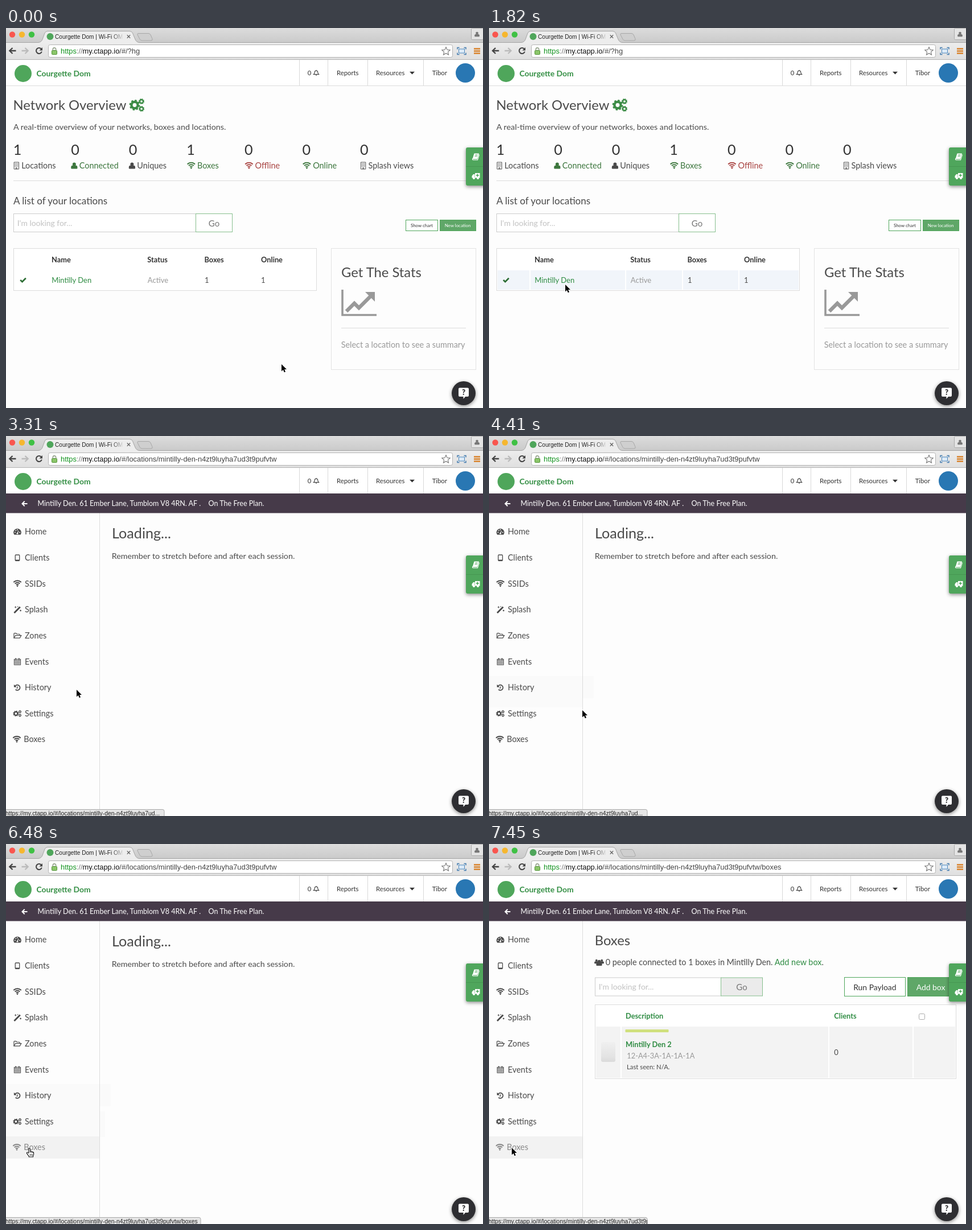
An HTML page for the animation above (8000 ms loop, 838x668 px).

```html
<!DOCTYPE html>
<html lang="en">
<head>
<meta charset="utf-8">
<title>Network overview</title>
<style>
  html, body { margin: 0; width: 100%; height: 100%; overflow: hidden; background: #fdfdfd; }
  svg { display: block; width: 100vw; height: 100vh; }
  text { font-family: Lato, sans-serif; white-space: pre; }
  .ui { font-family: "Liberation Sans", Arial, sans-serif; }
  .line { fill: none; stroke: currentColor; }
</style>
</head>
<body>
<svg id="stage" viewBox="0 0 838 668" xmlns="http://www.w3.org/2000/svg"></svg>
<script>
const LOOP = 8000;
const INK = '#4a4a4a', DARK = '#333', GREY = '#999', GREEN = '#2f8c43', LEAF = '#4fa65b',
      OK = '#3c763d', BAD = '#a94442', RULE = '#dcdcdc';
const PLACE = 'Mintilly Den', BRAND = 'Courgette Dom';
const SLUG = '/#/locations/mintilly-den-n4zt9luyha7ud3t9pufvtw';

// Drawing helpers
const text = (x, y, size, str, fill = INK, extra = '') =>
  `<text x="${x}" y="${y}" font-size="${size}" fill="${fill}" ${extra}>${str}</text>`;
const bold = (x, y, size, str, fill = DARK) => text(x, y, size, str, fill, 'font-weight="700"');
const ui = (x, y, size, str, fill) => text(x, y, size, str, fill, 'class="ui"');
const rect = (x, y, w, h, fill, extra = '') =>
  `<rect x="${x}" y="${y}" width="${w}" height="${h}" fill="${fill}" ${extra}/>`;
const frame = (x, y, w, h, stroke, fill = 'none', extra = '') =>
  rect(x + .5, y + .5, w - 1, h - 1, fill, `stroke="${stroke}" ${extra}`);
const path = (d, width = 1, extra = '') => `<path class="line" d="${d}" stroke-width="${width}" ${extra}/>`;
const solid = d => `<path d="${d}" fill="currentColor"/>`;
const dot = (x, y, r, fill = 'currentColor') => `<circle cx="${x}" cy="${y}" r="${r}" fill="${fill}"/>`;
const at = (x, y, body, color = INK, scale = 1) =>
  `<g transform="translate(${x} ${y}) scale(${scale})" color="${color}">${body}</g>`;
// Shows content only inside the given [from, to) windows
const during = (body, ...spans) => `<g data-on='${JSON.stringify(spans)}'>${body}</g>`;

const gear = (x, y, r) => `<g transform="translate(${x} ${y})" class="line">
  <circle r="${r * .6}" stroke-width="${r * .46}"/>
  <circle r="${r * .88}" stroke-width="${r * .26}" stroke-dasharray="${r * .37} ${r * .321}"/></g>`;
const person = solid('M-6 4.5V3Q-6-.5-2.5-.5H2.5Q6-.5 6 3V4.5Q6 6 4.5 6H-4.5Q-6 6-6 4.5z') + dot(0, -2.8, 3.2);
const scaled = (x, y, scale, body) => `<g transform="translate(${x} ${y}) scale(${scale})">${body}</g>`;

const icons = {
  wifi: path('M-7.2-7.2A10 10 0 0 1 7.2-7.2M-4.7-4.5A6.5 6.5 0 0 1 4.7-4.5M-2.3-2A3.2 3.2 0 0 1 2.3-2', 2) + dot(0, 0, 1.4),
  user: person,
  building: path('M-4.5-6.5H4.5V6.5H-4.5zM-1 6.5V4H1V6.5') + path('M-2.2-4.6V3M0-4.6V3M2.2-4.6V3', 1.2, 'stroke-dasharray="1.3 1.1"'),
  check: path('M-4.8 0L-1.5 3.2 4.8-3.2', 2.7),
  cogs: gear(-2.8, 0, 5.4) + gear(4.8, -3.4, 2.9) + gear(4.8, 3.4, 2.9),
  home: solid('M-6 5.5A7.4 7.4 0 1 1 6 5.5z') + dot(-4.5, 1, 1, '#fff') + dot(-3, -2.6, 1, '#fff') +
    dot(0, -4, 1, '#fff') + dot(4.5, 1, 1, '#fff') + '<path d="M0 3L2-2" stroke="#fff" stroke-width="1.2"/>' + dot(0, 3, 1.5, '#fff'),
  tablet: path('M-4-4.5Q-4-5.5-3-5.5H3Q4-5.5 4-4.5V4.5Q4 5.5 3 5.5H-3Q-4 5.5-4 4.5zM-4 4.4H4', 1.4),
  wand: path('M-6 6L5.2-5.2', 3) + path('M-3.5-6.5V-3M-5.2-4.7H-1.8M6 0V3.2M4.4 1.6H7.6M.8-7V-5', 1.1),
  folder: path('M-6.5 4.5V-3.7Q-6.5-4.7-5.5-4.7H-2.5L-1-3H3.5Q4.5-3 4.5-2V-.5M-6.5 4.5L-3.5-.5H7.3L4.5 4.5z', 1.3),
  calendar: path('M-6-4.5H6V6H-6zM-6-2H6', 1.1) + path('M-6 .8H6M-6 3.4H6M-3-2V6M0-2V6M3-2V6', .8) + path('M-3-6.7V-3.4M3-6.7V-3.4', 2),
  history: path('M-4.2-2.8A5 5 0 1 1-3.6 3.6', 1.9) + solid('M-6.5-6V-.8H-1.3z') + path('M.3-2.5V1H-2', 1.2),
  group: scaled(-4.7, -1.5, .62, person) + scaled(4.7, -1.5, .62, person) + scaled(0, .8, .85, person),
  back: path('M5 0H-3.5M.2-4.2L-4 0 .2 4.2', 2),
  bell: path('M-4.5 2.5Q-2.7 1-2.7-1.5Q-2.5-4 0-4Q2.5-4 2.7-1.5Q2.7 1 4.5 2.5zM-1 3.5Q0 5 1 3.5M0-4V-5.2', 1.1)
};
const icon = (name, x, y, color, scale) => at(x, y, icons[name], color, scale);

// Browser window
const address = tail => ui(96, 45, 12.85,
  `<tspan fill="#12931f">https</tspan><tspan fill="#777">://</tspan>my.ctapp.io<tspan fill="#444">${tail}</tspan>`, '#111');

const chrome = `
  ${rect(0, 0, 838, 26, 'url(#strip)')}${rect(0, 25, 838, 31, 'url(#bar)')}
  <path d="M0 25.5H57Q62 25 64 20L68 9Q69.5 5.500 73 5.500H217Q221 5.500 222.500 9L227 20Q229 25 234 25.500H838" fill="#ededed" stroke="#a5a5a5"/>
  <path d="M233 9.500H250Q253 9.500 254 12L257 19Q258 22 255 22H239Q236 22 235 19.500L231 12Q230 9.500 233 9.500z" fill="#cfcfcf" stroke="#a8a8a8"/>
  ${dot(11, 11.5, 5.2, '#f9564f')}${dot(28, 11.5, 5.2, '#f6b72f')}${dot(45, 11.5, 5.2, '#3fc144')}
  ${dot(77.5, 15, 6, LEAF)}${ui(86, 19, 10.1, BRAND + ' | Wi-Fi OM', 'url(#fade)')}
  ${at(215.5, 15, path('M-2.7-2.7L2.7 2.7M-2.7 2.7L2.7-2.7', 1.3), '#666')}
  ${frame(817, 0, 22, 21, '#aaa', '#e4e4e4', 'rx="2"')}${icon('user', 827.5, 11, '#777', .72)}
  ${at(11, 40, path('M6.5 0H-4.5M.5-5L-4.7 0 .5 5', 2.3), '#444')}
  ${at(34, 40, path('M-6.5 0H4.5M-.5-5L4.7 0-.5 5', 2.3), '#bbb')}
  ${at(58, 40, path('M4.2-2.8A5 5 0 1 0 4.8 1.5', 2.1) + solid('M6-6V-.5H.5z'), '#444')}
  ${frame(74, 29, 711, 23, '#b4b4b4', '#fff', 'rx="3"')}
  ${at(85, 41, rect(-4.5, -1.5, 9, 7, '#8cc66a', 'stroke="#4f9135" rx="1"') + path('M-2.7-1.5V-3.5A2.7 2.7 0 0 1 2.7-3.5V-1.5', 1.4), '#8a9a80')}
  ${at(773, 40.5, path('M0-7L2.1-2.3 7.2-1.8 3.4 1.6 4.5 6.6 0 4-4.5 6.6-3.4 1.6-7.2-1.8-2.1-2.3z', 1.1), '#777')}
  ${at(800.5, 40.5, rect(-5, -3.5, 10, 7, '#dcebf8', 'stroke="#4d87bd"') + path('M-7.5-3V-6H-4M4-6H7.5V-3M7.5 3V6H4M-4 6H-7.5V3', 1.4), '#3f79ae')}
  ${at(827.5, 40.5, path('M-5.5-4H5.5M-5.5 0H5.5M-5.5 4H5.5', 2.3), '#d9822b')}
  ${during(address('/#/?hg'), [0, 2790])}
  ${during(address(SLUG), [2790, 6780])}
  ${during(address(SLUG + '/boxes'), [6780, LOOP])}
  ${rect(0, 55, 838, 1, '#b5b5b5')}`;

const header = `
  ${rect(0, 56, 838, 45, '#fff')}${rect(0, 101, 838, 1, RULE)}
  ${dot(30, 80, 15, LEAF)}${bold(53.5, 84.8, 13.9, BRAND, '#369046')}
  ${[515, 565, 635, 733].map(x => rect(x, 56, 1, 45, '#d9d9d9')).join('')}
  ${text(529.7, 83, 11.3, '0', DARK)}${icon('bell', 545, 79, DARK)}
  ${text(581, 83, 11.3, 'Reports', DARK)}${text(650, 83, 11.3, 'Resources', DARK)}
  ${at(713.5, 79, solid('M-4.5-2.3H4.5L0 2.5z'), DARK)}
  ${text(748.7, 83, 11.3, 'Tibor', DARK)}${dot(807, 79, 17, '#2977b3')}`;

// Overview page
const stats = [[1, 'Locations', 'building', INK], [0, 'Connected', 'user', OK], [0, 'Uniques', 'user', INK],
  [1, 'Boxes', 'wifi', OK], [0, 'Offline', 'wifi', BAD], [0, 'Online', 'wifi', OK], [0, 'Splash views', 'building', INK]];
const stat = ([count, label, name, color], i) => {
  const x = 12.7 + 101.55 * i, wide = name === 'wifi';
  return text(x, 223, 25.2, count, DARK) + text(x + (wide ? 18.7 : 14.5), 247, 14.4, label, color) +
    icon(name, x + (wide ? 8 : 5.6), wide ? 246.2 : 242, color, .93);
};
const cells = (spans, y, h, fill) => spans.map(([a, b]) => rect(a, y, b - a, h, fill)).join('');
const searchBox = (x, y, w, goW, goFill) =>
  frame(x, y, w + 1, 33, '#ccc', '#fff') + text(x + 6.7, y + 21.5, 13.9, "I'm looking for...", '#c2c2c2') +
  frame(x + w, y, goW, 33, '#86bf8d', goFill) + text(x + w + goW / 2, y + 22.5, 15, 'Go', '#777', 'text-anchor="middle"');

const overview = `
  ${text(12.4, 144, 23.8, 'Network Overview')}
  <g color="#3c8c46">${gear(226, 135.5, 9.3)}${gear(238, 129, 5)}${gear(238, 142, 5)}</g>
  ${text(13, 179, 14.3, 'A real-time overview of your networks, boxes and locations.')}
  ${stats.map(stat).join('')}${rect(13, 268, 812, 1, RULE)}
  ${text(13, 310, 17, 'A list of your locations')}
  ${searchBox(13, 326, 320, 65, '#fff')}
  ${frame(702, 337, 57, 20, LEAF, '#fff')}${text(711, 349.5, 7.9, 'Show chart', DARK)}
  ${frame(762, 337, 64, 20, LEAF, '#5fa768')}${text(770.7, 349.5, 7.9, 'New location', '#fff')}
  ${frame(13, 387, 533, 75, RULE, '#fff')}
  ${during(cells([[15, 71], [73, 239], [241, 339], [341, 438], [440, 544]], 426, 34, '#f1f5fa'), [1640, 3250])}
  ${during(rect(14, 445, 264, 15, '#fff'), [2000, 3250])}
  ${[[80, 'Name'], [248.3, 'Status'], [348.5, 'Boxes'], [448, 'Online']].map(([x, s]) => bold(x, 412, 12.8, s)).join('')}
  ${icon('check', 30, 443, '#2d6e35')}
  ${during(text(80.2, 447.5, 13, PLACE, GREEN), [0, 2000])}
  ${during(text(80.2, 447.5, 13, PLACE, '#226a34'), [2000, 3250])}
  ${text(248.8, 447.5, 13, 'Active', GREY)}${text(349, 447.5, 13, '1')}${text(448, 447.5, 13, '1')}
  ${frame(571, 387, 255, 214, '#e3e3e3')}${text(589, 438, 23.8, 'Get The Stats')}
  ${at(589, 460, path('M2 0V44.5H62', 3.6) + path('M9 38L23 24 31 32 51 12', 6.5) + solid('M42 4H59V21z'), GREY)}
  ${rect(589, 527, 219, 1, RULE)}${text(588.7, 561.5, 14.4, 'Select a location to see a summary', GREY)}`;

// Location pages
const menu = [['Home', 'home'], ['Clients', 'tablet'], ['SSIDs', 'wifi'], ['Splash', 'wand'], ['Zones', 'folder'],
  ['Events', 'calendar'], ['History', 'history'], ['Settings', 'cogs'], ['Boxes', 'wifi']];
const menuY = i => 168.5 + 45.63 * i;
const menuItem = (i, color = INK) => {
  const [label, name] = menu[i], y = menuY(i), last = i === 8;
  return text(last ? 31.2 : 33, y + 4.9, 14.4, label, color) +
    icon(name, last ? 19 : 20, name === 'wifi' ? y + 4 : y, color, .93);
};
const hovered = (i, ...spans) =>
  during(rect(0, Math.round(menuY(i) - 20), 164, 39, '#f2f2f2') + menuItem(i, '#888'), ...spans);

const sidebar = `
  ${during(rect(0, 422, 164, 55, '#fafafa') + rect(165, 422, 19, 39, '#fafafa'), [4210, 6900])}
  ${during(rect(0, 477, 164, 37, '#fafafa') + rect(165, 470, 9, 45, '#fafafa'), [4530, 6900])}
  ${rect(164, 135, 1, 533, RULE)}
  ${menu.map((_, i) => menuItem(i)).join('')}
  ${hovered(6, [4150, 4340])}${hovered(7, [4530, 4710])}${hovered(8, [4710, 6900], [7150, LOOP])}`;

const banner = `${rect(0, 101, 838, 34.5, '#463a49')}${icon('back', 32.5, 119, '#fff')}
  ${text(55.5, 123.4, 12.55, PLACE + '. 61 Ember Lane, Tumblom V8 4RN. AF .', '#fff')}
  ${text(355.5, 123.4, 12.55, 'On The Free Plan.', '#fff')}`;

const loading = text(186, 180.4, 25.2, 'Loading...') +
  text(185.7, 216.4, 14.3, 'Remember to stretch before and after each session.');

const boxes = `
  ${text(185.7, 178, 23.8, 'Boxes')}${icon('group', 193.5, 208, INK)}
  ${text(204.7, 213, 14.4, `0 people connected to 1 boxes in ${PLACE}. <tspan fill="${GREEN}">Add new box</tspan>.`)}
  ${searchBox(186, 234.5, 221, 74, '#ebebeb')}
  ${frame(624, 234, 108, 34, LEAF, '#fff')}${text(640.2, 256.5, 13.9, 'Run Payload', DARK)}
  ${frame(735, 234, 91, 34, LEAF, '#5fa768')}${text(750.7, 256.5, 13.9, 'Add box', '#fff')}
  ${frame(186, 282, 635, 131, RULE, '#fff')}
  ${cells([[188, 231], [233, 596], [598, 744], [746, 819]], 321, 90, '#f3f3f3')}
  ${bold(240, 307, 12.8, 'Description', GREEN)}${bold(606.3, 307, 12.8, 'Clients', GREEN)}
  ${frame(755, 298, 11, 11, '#aaa', '#fff', 'rx="2"')}
  ${rect(239.5, 326, 76, 5, '#d0e07d', 'rx="1"')}
  ${rect(197, 348, 25, 35, 'url(#device)', 'rx="3"')}
  ${bold(240, 357, 12.8, PLACE + ' 2', GREEN)}${text(242.3, 377, 12.8, '12-A4-3A-1A-1A-1A', GREY)}
  ${text(242, 396, 11.3, 'Last seen: N/A.')}${text(606.3, 370.5, 13, '0')}`;

// Floating parts
const sideTab = `<g filter="url(#shadow)">${rect(808, 210, 36, 67, LEAF, 'rx="3"')}</g>${rect(808, 243, 30, 1, '#469652')}
  ${at(825, 226, solid('M-2.5-5.5H6L3 4.5H-5.5z') + path('M-5 3Q-6.5 6-4 6H3.5L6.5-3.5', 1.1) + '<path d="M-.8-3H3.5M-1.5-.7H2.8" stroke="#4fa65b"/>', '#fff')}
  ${at(825.5, 260.5, solid('M-1.5-5.5H7V3H-1.5zM-7 3V-.5L-4.5-3.5H-2V3z') + dot(-3.5, 3.6, 2) + dot(3.5, 3.6, 2) +
    '<path d="M2.8-4V1M.3-1.5H5.3" stroke="#4fa65b" stroke-width="1.6"/>', '#fff')}`;
const help = `<g filter="url(#shadow)">${dot(804, 642, 21, '#2f2f31')}</g>
  <path d="M797 632.5H811Q813 632.5 813 634.5V646Q813 648 811 648H807L803.5 652V648H797Q795 648 795 646V634.5Q795 632.5 797 632.5z" fill="#fff"/>
  ${text(804, 645, 13, '?', '#2f2f31', 'text-anchor="middle" font-weight="900"')}`;

const statusUrl = 'https://my.ctapp.io' + SLUG;
const status = `<g id="status"><rect id="bubble" x="-5" y="656.5" height="20" rx="3" fill="#e6e6e6" stroke="#a9a9a9"/>
  <g clip-path="url(#bubbleClip)">
    ${during(ui(-1, 667.3, 10.4, statusUrl.replace(/3t9pufvtw$/, '...'), '#222'), [0, 6250])}
    ${during(ui(-1, 667.3, 10.4, statusUrl + '/boxes', '#222'), [6250, LOOP])}
  </g></g>`;

const handSpans = [[1970, 3250], [6250, 7300]];
const arrowSpans = [[0, 1970], [3250, 6250], [7300, LOOP]];
const cursor = `<g id="cursor" stroke-linejoin="round">
  ${during('<path d="M0 0V12.5L2.9 9.8 4.8 14.2 7 13.3 5.1 9H9z" stroke="#fff" stroke-width="1.8" paint-order="stroke"/>', ...arrowSpans)}
  ${during(`<path d="M-1.3 8.5V1.3A1.3 1.3 0 0 1 1.3 1.3V5.5Q1.8 4.6 3 5Q3.8 5.2 3.9 6Q5 5.4 6 6.5Q7.6 6.2 7.6 8V10.5Q7.4 12 6.6 13V15H-.8V13.6Q-2 12.5-4.5 8.6Q-5 7-3.6 7Q-2.6 7-1.3 8.5z"
    fill="#fff" stroke="#111" stroke-width="1.1"/><path d="M1.3 5.5V8M3.9 6V8.2M6 6.5V8.4M1.3 10V13M3.3 10V13M5.3 10V13" stroke="#111" stroke-width=".8"/>`, ...handSpans)}</g>`;

const gradient = (id, dir, stops) => `<linearGradient id="${id}" ${dir}>${stops.map(([o, c, a = 1]) =>
  `<stop offset="${o}" stop-color="${c}" stop-opacity="${a}"/>`).join('')}</linearGradient>`;
const down = 'x1="0" y1="0" x2="0" y2="1"';

const stage = document.getElementById('stage');
stage.innerHTML = `<defs>
    ${gradient('strip', down, [[0, '#dcdcdc'], [1, '#cacaca']])}${gradient('bar', down, [[0, '#ededed'], [1, '#dfdfdf']])}
    ${gradient('device', down, [[0, '#f0f0f0'], [.75, '#e3e3e3'], [1, '#dadada']])}
    ${gradient('fade', 'gradientUnits="userSpaceOnUse" x1="186" x2="207" y1="0" y2="0"', [[0, '#222'], [1, '#222', 0]])}
    <filter id="shadow" x="-40%" y="-40%" width="180%" height="180%"><feDropShadow dx="0" dy="2" stdDeviation="3.2" flood-opacity=".45"/></filter>
    <clipPath id="bubbleClip"><rect id="bubbleWindow" x="0" y="656" height="12"/></clipPath>
  </defs>
  ${rect(0, 0, 838, 668, '#fdfdfd')}${chrome}${header}
  ${during(overview, [0, 3250])}
  ${during(sidebar, [3250, LOOP])}
  ${during(banner, [3310, 6840], [7150, LOOP])}
  ${during(loading, [3310, 6840])}
  ${during(boxes, [7450, LOOP])}
  ${sideTab}${help}${status}${cursor}`;

// Pointer legs: first change, last change, number of steps, end point
const legs = [
  [870, 870, 1, 482.5, 592], [1080, 1820, 13, 134, 451], [1910, 2230, 6, 123, 446], [2730, 2920, 4, 125, 447],
  [3250, 3250, 1, 124, 446], [3700, 3700, 1, 125, 446], [3850, 3850, 1, 126, 446],
  [4150, 4410, 5, 164, 482], [4470, 4890, 8, 118, 524], [5370, 5590, 4, 90, 526], [5650, 6130, 9, 40, 533],
  [6190, 6480, 4, 41, 535], [7300, 7300, 1, 40, 534]
];
const clamp = v => Math.min(1, Math.max(0, v));
const smooth = p => p * p * (3 - 2 * p);

function pointer(t) {
  let x = 484, y = 591;
  for (const [start, end, steps, toX, toY] of legs) {
    if (t < start) break;
    const gap = (end - start) / (steps - 1) || 1;
    const p = smooth(clamp((Math.floor((t - start) / gap + .001) + 1) / steps));
    x += (toX - x) * p;
    y += (toY - y) * p;
  }
  return [x, y];
}

const timed = [...stage.querySelectorAll('[data-on]')].map(node => ({ node, spans: JSON.parse(node.dataset.on) }));
const [cursorNode, statusNode, bubble, bubbleWindow] =
  ['cursor', 'status', 'bubble', 'bubbleWindow'].map(id => document.getElementById(id));

function draw() {
  const t = performance.now() % LOOP;
  for (const { node, spans } of timed)
    node.style.display = spans.some(([from, to]) => t >= from && t < to) ? '' : 'none';
  cursorNode.setAttribute('transform', `translate(${pointer(t)})`);
  const width = t < 6840 ? 278 + 64 * smooth(clamp((t - 6300) / 180)) : 278;
  bubble.setAttribute('width', width + 5);
  bubbleWindow.setAttribute('width', width);
  statusNode.style.opacity = clamp((t - 2000) / 230);
  requestAnimationFrame(draw);
}
draw();
</script>
</body>
</html>
```
